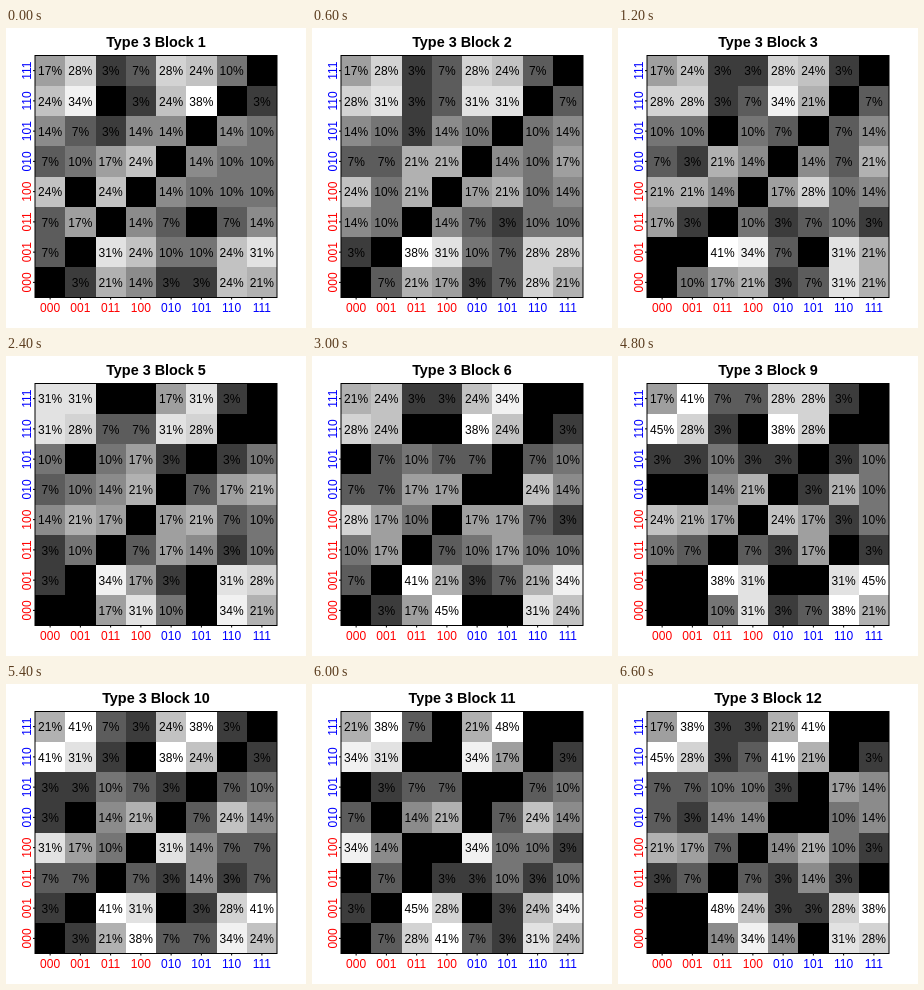
Write an HTML page that moves like this. It is 300 px wide and 300 px high and loops after 9000 ms.

```html
<!DOCTYPE html>
<html lang="en">
<head>
<meta charset="utf-8">
<title>Type 3 response blocks</title>
<style>
  html, body { margin: 0; width: 100%; height: 100%; overflow: hidden; background: #fff; }
  svg { display: block; width: 300px; height: 300px; }
  text { font: 12px "Liberation Sans", Arial, sans-serif; text-anchor: middle; }
  .title { font-size: 14.4px; font-weight: bold; }
</style>
</head>
<body>
<svg id="plot" viewBox="0 0 300 300"></svg>
<script>
const STEP = 600, LOOP = 9000, LAST = 12;
const LEFT = 29, TOP = 27.5, CELL = 30.25, SIDE = 8 * CELL;
const PEOPLE = 29;
const labels = ['000', '001', '011', '100', '010', '101', '110', '111'];

// Percentages per block, top row first; blocks not listed lie between their neighbours.
const known = {
  1: `17 28  3  7 28 24 10  0
      24 34  0  3 24 38  0  3
      14  7  3 14 14  0 14 10
       7 10 17 24  0 14 10 10
      24  0 24  0 14 10 10 10
       7 17  0 14  7  0  7 14
       7  0 31 24 10 10 24 31
       0  3 21 14  3  3 24 21`,
  3: `17 24  3  3 28 24  3  0
      28 28  3  7 34 21  0  7
      10 10  0 10  7  0  7 14
       7  3 21 14  0 14  7 21
      21 21 14  0 17 28 10 14
      17  3  0 10  3  7 10  3
       0  0 41 34  7  0 31 21
       0 10 17 21  3  7 31 21`,
  5: `31 31  0  0 17 31  3  0
      31 28  7  7 31 28  0  0
      10  0 10 17  3  0  3 10
       7 10 14 21  0  7 17 21
      14 21 17  0 17 21  7 10
       3 10  0  7 17 14  3 10
       3  0 34 17  3  0 31 28
       0  0 17 31 10  0 34 21`,
  6: `21 24  3  3 24 34  0  0
      28 24  0  0 38 24  0  3
       0  7 10  7  7  0  7 10
       7  7 17 17  0  0 24 14
      28 17 10  0 17 17  7  3
      10 17  0  7 10 17 10 10
       7  0 41 21  3  7 21 34
       0  3 17 45  0  0 31 24`,
  9: `17 41  7  7 28 28  3  0
      45 28  3  0 38 28  0  0
       3  3 10  3  3  0  3 10
       0  0 14 21  0  3 21 10
      24 21 17  0 24 17  3 10
      10  7  0  7  3 17  0  3
       0  0 38 31  0  0 31 45
       0  0 10 31  3  7 38 21`,
  11: `21 38  7  0 21 48  0  0
       34 31  0  0 34 17  0  3
        0  3  7  7  0  0  7 10
        7  0 14 21  0  7 24 14
       34 14  0  0 34 10 10  3
        0  7  0  3  3 10  3 10
        3  0 45 28  0  3 24 34
        0  7 28 41  7  3 31 24`,
  12: `17 38  3  3 21 41  0  0
       45 28  3  7 41 21  0  3
        7  7 10 10  3  0 17 14
        7  3 14 14  0  0 10 14
       21 17  7  0 14 21 10  3
        3  7  0  7  3 14  3  0
        0  0 48 24  3  3 28 38
        0  0 14 34 14  0 31 28`
};

const counts = {};
for (const n in known) {
  counts[n] = known[n].trim().split(/\s+/).map(p => Math.round(p * PEOPLE / 100));
}
const keys = Object.keys(known).map(Number);

function blockCounts(n) {
  if (counts[n]) return counts[n];
  const b = keys.find(k => k > n), a = keys[keys.indexOf(b) - 1];
  return counts[a].map((v, i) => Math.round(v + (counts[b][i] - v) * (n - a) / (b - a)));
}

function shade(count) {
  const g = Math.round(255 * Math.min(1, count / 11) ** 0.6);
  return `rgb(${g},${g},${g})`;
}

const plot = document.getElementById('plot');
function add(tag, attrs, text = '') {
  const el = document.createElementNS('http://www.w3.org/2000/svg', tag);
  for (const k in attrs) el.setAttribute(k, attrs[k]);
  el.textContent = text;
  plot.append(el);
  return el;
}

const mid = i => (i + 0.5) * CELL;
const title = add('text', { class: 'title', x: 150, y: 19 });
const cells = Array.from({ length: 64 }, (_, i) => add('rect', {
  x: LEFT + (i % 8) * CELL, y: TOP + Math.floor(i / 8) * CELL,
  width: CELL, height: CELL, 'shape-rendering': 'crispEdges'
}));
const values = cells.map((_, i) => add('text', {
  x: LEFT + mid(i % 8), y: TOP + mid(Math.floor(i / 8)) + 4.8
}));
add('rect', { x: LEFT, y: TOP, width: SIDE, height: SIDE, fill: 'none', stroke: '#000', 'stroke-width': 1 });

labels.forEach((name, i) => {
  const fill = i < 4 ? '#f00' : '#00f';
  const x = LEFT + mid(i), y = TOP + SIDE - mid(i), base = TOP + SIDE;
  add('path', { d: `M${x} ${base}v2M${LEFT} ${y}h-2`, stroke: '#000' });
  add('text', { x, y: 284, fill }, name);
  add('text', { transform: `translate(25 ${y}) rotate(-90)`, fill }, name);
});

let shown = 0;
function show(n) {
  if (n === shown) return;
  shown = n;
  title.textContent = `Type 3 Block ${n}`;
  blockCounts(n).forEach((c, i) => {
    cells[i].setAttribute('fill', shade(c));
    values[i].textContent = c ? `${Math.round(100 * c / PEOPLE)}%` : '';
  });
}

const start = performance.now();
function tick() {
  const t = (performance.now() - start) % LOOP;
  show(Math.min(LAST, 1 + Math.floor(t / STEP)));
  requestAnimationFrame(tick);
}
tick();
</script>
</body>
</html>
```
